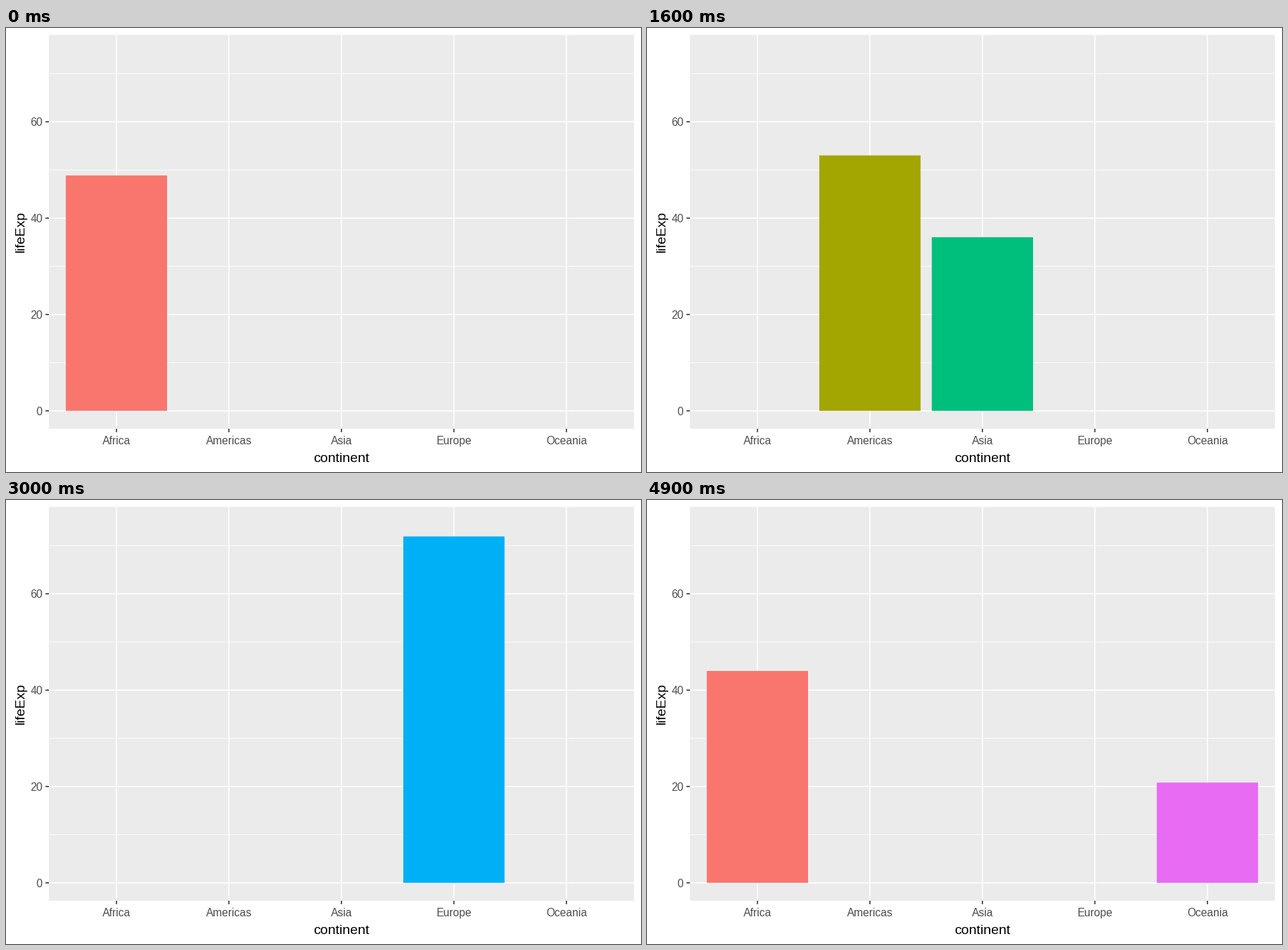
Recreate the animation shown at these times as a matplotlib script. Size 895 by 626 pixels, loop 5 s.

```python
import matplotlib.pyplot as plt
from matplotlib.animation import FuncAnimation
from matplotlib.patches import Rectangle

W, H, DPI = 895, 626, 64
LEFT, RIGHT, TOP, BOTTOM = 60.5, 885, 9.7, 565
BARS = [
    ("Africa", 48.865, "#F8766D"),
    ("Americas", 64.659, "#A3A500"),
    ("Asia", 60.065, "#00BF7D"),
    ("Europe", 71.904, "#00B0F6"),
    ("Oceania", 74.326, "#E76BF3"),
]
STEP = (RIGHT - LEFT) / 5.2
UNIT = (BOTTOM - TOP) / 1.1 / BARS[-1][1]
ZERO = BOTTOM - (BOTTOM - TOP) * 0.05 / 1.1

CYCLE, HOLD = 10, 5      # frames per state, last resting frame
GROW_FROM, SHRINK_TO = 0.5, 0.1


def px(size):
    """Pixels to points."""
    return size * 72 / DPI


def x_at(i):
    return LEFT + STEP * (0.6 + i)


def y_at(value):
    return ZERO - value * UNIT


plt.rcParams["font.family"] = "Liberation Sans"
fig = plt.figure(figsize=(W / DPI, H / DPI), dpi=DPI, facecolor="white")
ax = fig.add_axes([0, 0, 1, 1])
ax.set_xlim(0, W)
ax.set_ylim(H, 0)
ax.axis("off")


def line(xs, ys, width, color="white", z=2):
    ax.plot(xs, ys, color=color, lw=px(width), zorder=z,
            solid_capstyle="butt", snap=False)


def label(x, y, text, size, color, **kw):
    ax.text(x, y, text, fontsize=px(size), color=color,
            **{"ha": "center", "va": "baseline", **kw})


ax.add_patch(Rectangle((LEFT, TOP), RIGHT - LEFT, BOTTOM - TOP,
                       fc="#EBEBEB", lw=0, snap=False, zorder=1))

for value in (10, 30, 50, 70):
    line([LEFT, RIGHT], [y_at(value)] * 2, 0.9)
for value in (0, 20, 40, 60):
    y = y_at(value)
    line([LEFT, RIGHT], [y, y], 1.6)
    line([LEFT - 4.9, LEFT], [y, y], 1.6, "#333333")
    label(51.5, y + 6.2, str(value), 15.5, "#4D4D4D", ha="right")

rects = []
for i, (name, value, color) in enumerate(BARS):
    x = x_at(i)
    line([x, x], [TOP, BOTTOM], 1.6)
    line([x, x], [BOTTOM, BOTTOM + 4.9], 1.6, "#333333")
    label(x, 586.8, name, 15.5, "#4D4D4D")
    rects.append(ax.add_patch(Rectangle((x - 0.45 * STEP, ZERO), 0.9 * STEP, 0,
                                        fc=color, lw=0, snap=False, zorder=3)))

label((LEFT + RIGHT) / 2, 612, "continent", 19.4, "black")
label(25.8, (TOP + BOTTOM) / 2, "lifeExp", 19.4, "black", rotation=90,
      ha="right", va="center") if False else None
ax.text(25.8, (TOP + BOTTOM) / 2, "lifeExp", fontsize=px(19.4), color="black",
        rotation=90, rotation_mode="anchor", ha="center", va="baseline")


def update(k):
    state, j = divmod(k, CYCLE)
    scale = [0] * len(BARS)
    t = max(0, j - HOLD) / (CYCLE - HOLD)
    scale[state] = 1 - (1 - SHRINK_TO) * t
    if t > 0:
        scale[(state + 1) % len(BARS)] = GROW_FROM + (1 - GROW_FROM) * t
    for rect, (_, value, _), s in zip(rects, BARS, scale):
        rect.set_visible(s > 0)
        rect.set_height(-value * s * UNIT)
    return rects


anim = FuncAnimation(fig, update, frames=CYCLE * len(BARS), interval=100,
                     repeat=True, repeat_delay=0)
plt.show()
```
